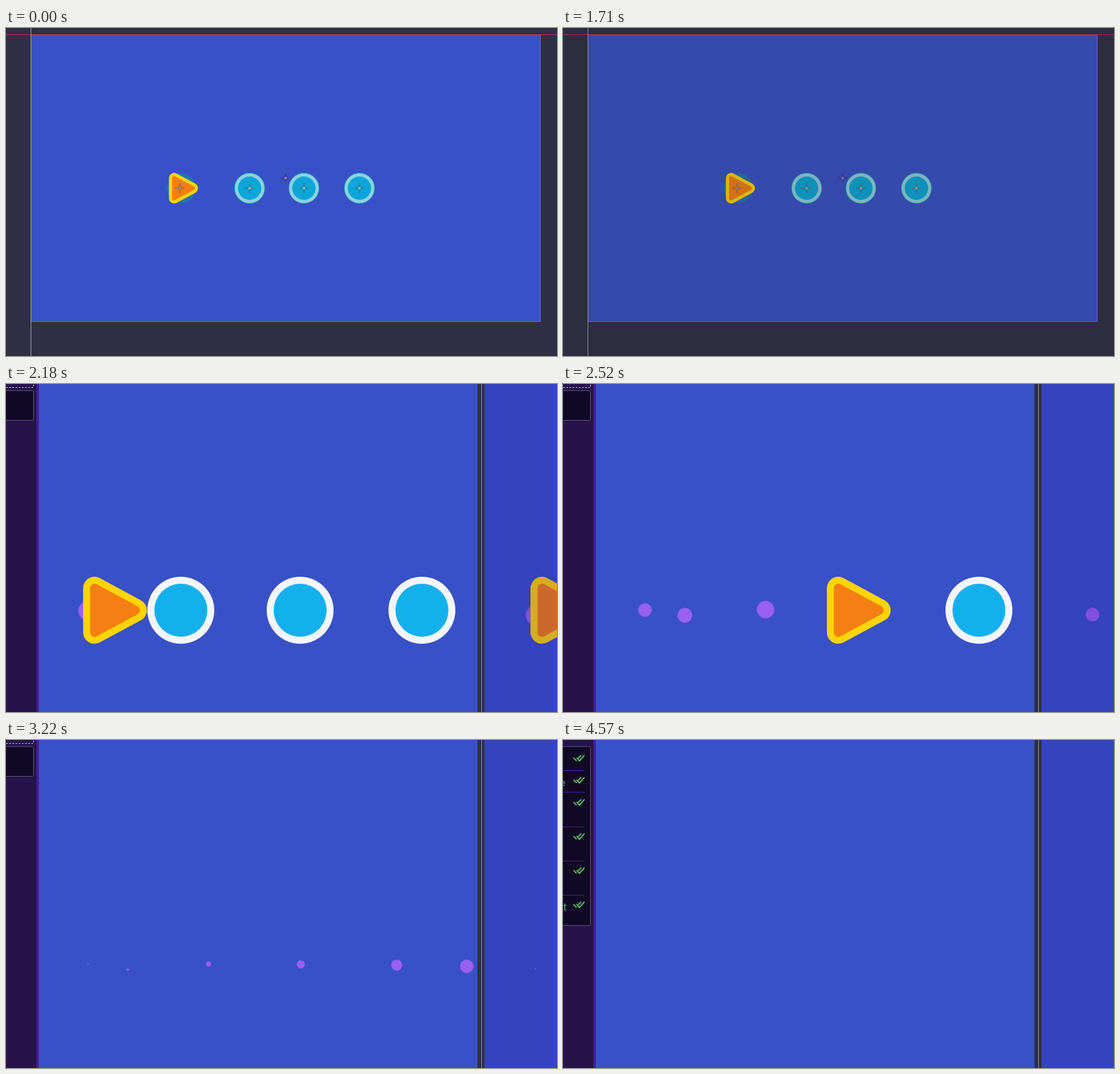
Recreate the animation shown at these times as an HTML page. Size 873 px wide and 519 px high, loop 5330 ms.

```html
<!DOCTYPE html>
<html lang="en">
<head>
<meta charset="utf-8">
<title>Scene preview</title>
<style>
  html, body { margin: 0; width: 100%; height: 100%; overflow: hidden; background: #302f45; }
  svg { display: block; width: 873px; height: 519px; }
  text { font: 14px "Noto Sans", sans-serif; fill: #cdcfd2; }
  .title { font-weight: 700; }
  .task { font: 16px Inter, sans-serif; fill: #55b85f; text-anchor: end; }

  /* Every animation shares the loop length; --t is its start in the loop. */
  .fade, .game, .run, .dot, .appear, .vanish, .dialog, .dash {
    animation: 5330ms linear var(--t, 0ms) infinite;
  }
  .game, .appear, .vanish, .dialog { animation-timing-function: step-end; }
  .game { opacity: 0; animation-name: game; }
  .appear { opacity: 0; animation-name: appear; }
  .dialog { opacity: 0; animation-name: dialog; }
  .vanish { animation-name: vanish; }
  .fade { opacity: 0; animation-name: fade; }
  .run { animation-name: run; }
  .dot { transform: scale(0); animation-name: shrink; }
  .dash { animation-name: dash; }

  @keyframes game { 0% { opacity: 0 } 36.96%, 100% { opacity: 1 } }
  @keyframes appear { 0% { opacity: 1 } 40%, 100% { opacity: 0 } }
  @keyframes vanish { 0% { opacity: 0 } 70%, 100% { opacity: 1 } }
  @keyframes dialog { 0% { opacity: 1 } 1.313%, 100% { opacity: 0 } }
  @keyframes fade {
    0%, 32.07% { opacity: 0 }
    32.08% { opacity: .16 }
    35.08%, 36.95% { opacity: .98 }
    36.96% { opacity: .9 }
    40.3%, 100% { opacity: 0 }
  }
  @keyframes run {
    0%, 38.22% { transform: translate(34px, 358px) }
    56.89%, 100% { transform: translate(900px, 358px) }
  }
  @keyframes shrink {
    0% { transform: none }
    21.44%, 100% { transform: translate(0, -4px) scale(0) }
  }
  @keyframes dash { to { stroke-dashoffset: -200 } }
</style>
</head>
<body>
<svg id="stage" viewBox="0 0 873 519"></svg>
<script>
const at = ms => `style="--t:${ms}ms"`;
const rect = (x, y, w, h, fill, more = "") =>
  `<rect x="${x}" y="${y}" width="${w}" height="${h}" fill="${fill}" ${more}/>`;
const place = (x, y, body, scale = 1) =>
  `<g transform="translate(${x} ${y}) scale(${scale})">${body}</g>`;
const each = (list, draw) => list.map(draw).join("");

const arrow = each([["#ffd500", 36], ["#f47f12", 14]], ([color, width]) =>
  `<path d="M-19-35V35L46 0Z" fill="${color}" stroke="${color}" stroke-width="${width}" stroke-linejoin="round"/>`);

const gizmo = (fill, line) =>
  `<g fill="${fill}" stroke="${line}"><path d="M-7 0H7M0-7V7" stroke-width="1.2"/>
   <circle r="1.2" cx="-6"/><circle r="1.2" cx="6"/><circle r="1.2" cy="-6"/><circle r="1.2" cy="6"/>
   <circle r="3"/></g>`;

const editorPickup = x => place(x, 253.5,
  `<circle r="24" fill="#8fd0e2" stroke="#159db4"/><circle r="18.5" fill="#0aa6d9"/>` +
  gizmo("#72b7cf", "#1b7390"));

const progress = (percent, ms) => `<g class="${ms ? "appear" : ""}" ${at(ms)}>` +
  rect(315, 310, 482, 24, "#363d4a", 'rx="1" stroke="#82868c" stroke-width="2"') +
  rect(318, 313, 8 + 4.68 * percent, 18, "#808388", 'rx="1"') +
  `<text x="556" y="327" text-anchor="middle">${percent}%</text></g>`;

const editor =
  rect(0, 0, 873, 519, "#302f45") +
  rect(39.5, 10.5, 807, 454, "#3851c6", 'stroke="#8f5cf0"') +
  rect(0, 10, 873, 1, "#d03a50", 'opacity=".75"') +
  rect(39, 0, 1, 519, "#a5a4b4") +
  `<circle cx="278" cy="253.5" r="22.5" fill="#2273b4" stroke="#1b83ad"/>` +
  place(275, 253.5, arrow, .455) +
  place(275.5, 253.5, gizmo("#a58d70", "#a8632c")) +
  each([386, 472, 560], editorPickup) +
  place(443, 237.5, gizmo("#7b79cc", "#302f80")) +
  `<g class="dialog" ${at(1330)}>` +
  rect(302, 267, 508, 110, "#363d4a") +
  `<text class="title" x="318" y="297">Saving Scene</text>
   <text x="318" y="357">Creating Thumbnail</text>` +
  progress(25, 0) + progress(50, 1350) + progress(75, 1370) + `</g>`;

const runner = `<g class="run">${arrow}</g>`;
const dot = ([x, y, ms]) =>
  place(x, y, `<circle class="dot" ${at(ms)} r="16" fill="#9860ee"/>`);
const pickup = ([x, ms]) => place(x, 358,
  `<g class="vanish" ${at(ms)}><circle r="53" fill="#f4f6ff"/><circle r="42" fill="#13b0ee"/></g>`);

const trail = [[130, 359, 2147], [193, 367, 2220], [321, 357.5, 2367],
               [467, 357.5, 2535], [619, 358, 2710], [730, 359.4, 2837]];

const practiceView = rect(52, 0, 695, 519, "#3851c6") +
  each([[277, 2194], [466, 2412], [659, 2634]], pickup) + each(trail, dot) + runner;

const solutionView = rect(758, 0, 115, 519, "#3851c6") +
  place(709, 0, dot([130, 366, 2147]) + runner) +
  rect(758, 0, 115, 519, "#3010a0", 'opacity=".2"');

const box = height =>
  rect(-10, 10.5, 53.5, height, "#110825", 'rx="2" stroke="#5c5273"');
const check = (y, i) =>
  `<path class="appear" ${at(3400 + i * 80)} transform="translate(0 ${y})"
    d="M16.5 0l5 5M21.5 0l4.5 5 8-9M24 1l5-5" fill="none" stroke="#63e46c" stroke-width="1.7"/>`;

const panel =
  rect(0, 0, 48, 519, "#26134b") + rect(48, 0, 4, 519, "#461b96") + box(47) +
  `<g class="vanish" ${at(3360)}><path class="dash" d="M0 5.5H43.5V0" fill="none"
    stroke="#b9b2c8" stroke-dasharray="3 2"/></g>
   <g class="appear" ${at(3360)}>` + box(283) +
  each([48, 82, 137, 191, 245], (y, i) => rect(0, y, 34, 1, i < 2 ? "#4c1f9f" : "#40286f")) +
  `<text class="task" x="3.5" y="73">Use the move code</text>
   <text class="task" x="6" y="270">Go to the right</text>` +
  each([28, 63, 98, 152, 206, 260], check) + `</g>`;

document.getElementById("stage").innerHTML =
  `<clipPath id="left">${rect(52, 0, 695, 519, "#000")}</clipPath>
   <clipPath id="right">${rect(758, 0, 115, 519, "#000")}</clipPath>` +
  editor +
  `<g class="game">` +
  rect(0, 0, 873, 519, "#302f45") +
  `<g clip-path="url(#left)">${practiceView}</g>
   <g clip-path="url(#right)">${solutionView}</g>` +
  rect(753, 0, 1, 519, "#92919c") + panel + `</g>` +
  rect(0, 0, 873, 519, "#242424", 'class="fade"');
</script>
</body>
</html>
```
